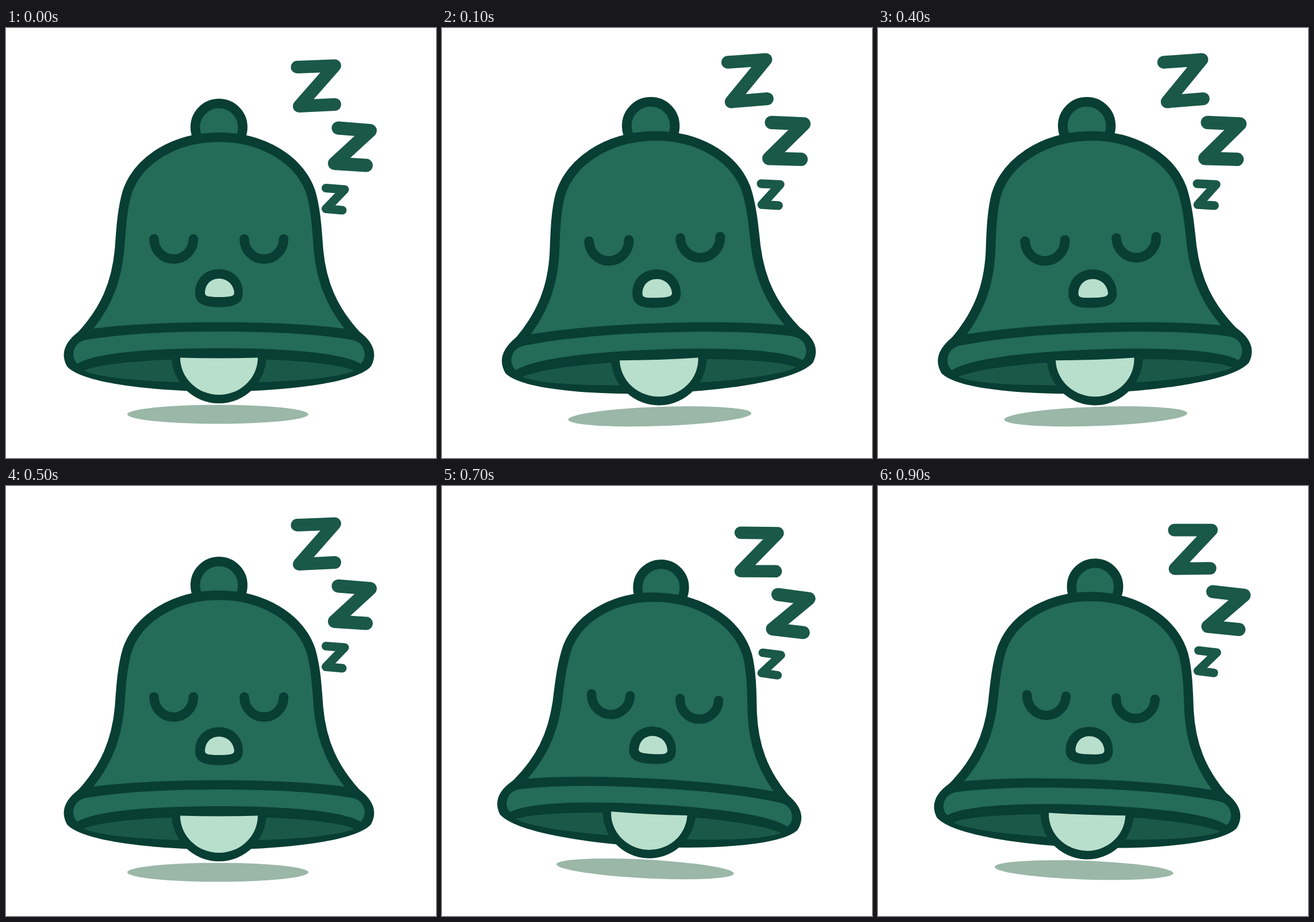
An HTML page that plays this animation: 748x748 px, repeating every 1 s.

```html
<!DOCTYPE html>
<html lang="en">
<head>
<meta charset="utf-8">
<title>Sleeping bell</title>
<style>
  html, body { margin: 0; width: 100%; height: 100%; overflow: hidden; background: #fff; }
  svg { display: block; width: 100vw; height: 100vh; }
  .dark { fill: #083e33; }
  .line { stroke: #083e33; stroke-width: 16.5; stroke-linecap: round; stroke-linejoin: round; }
  .body { fill: #246b58; }
  .inside { fill: #1a5848; }
  .light { fill: #b8dfcc; }
  .open { fill: none; }
  .snore { fill: none; stroke: #1a5848; stroke-linecap: round; stroke-linejoin: round; }
</style>
</head>
<body>
<svg viewBox="0 0 748 748">
  <g id="bell">
    <ellipse cx="368.5" cy="672" rx="157.5" ry="16.5" fill="#9ab7a8"/>

    <g class="snore">
      <path stroke-width="22" d="M506.5 68 L572 65.5 L510 136 L572 133"/>
      <path stroke-width="23" d="M578 174 L633.5 178.5 L571.5 235.5 L626.5 239"/>
      <path stroke-width="15" d="M556.5 278.5 L589 281 L556.5 314.5 L585 317"/>
    </g>

    <circle class="body line" cx="370.5" cy="172.5" r="41.3"/>
    <path class="body line" d="M132 534 C172 490 192 445 197.5 385 C200 350 202 315 211 285
      C231 228 295 190 370.5 190 C446 190 510 228 530 285
      C539 315 541 350 543.5 385 C549 445 569 490 609 534Z"/>

    <!-- rim -->
    <path class="dark line" d="M132 534 C200 524 290 520 370.5 520 S541 524 609 534
      C629 549 638 565 628 584 C601 610 481 624 370.5 624
      S140 610 113 584 C103 565 112 549 132 534Z"/>
    <path class="body" d="M117 567 C118 553 127 544 142 542 C210 531 290 528 370.5 528
      S531 531 599 542 C614 544 623 553 624 567 Q624 577 617 584
      C581 563 471 557 370.5 557 S160 563 124 584 Q117 577 117 567Z"/>
    <path class="inside" d="M135 596 C165 583 260 575 370.5 575 S576 583 606 596
      C576 610 481 617 370.5 617 S165 610 135 596Z"/>

    <!-- clapper -->
    <path class="dark" d="M288 570 A82.5 83 0 0 0 453 570Z"/>
    <path class="light" d="M303 573.5 Q370.5 575.5 438 573.5 A67.5 64.5 0 0 1 303 573.5Z"/>

    <!-- face -->
    <path class="open line" d="M257.5 367 a34.2 35 0 0 0 68.5 0 M414.5 367 a34.2 35 0 0 0 68.5 0"/>
    <path class="dark" d="M329 461 C329 436 347 419.5 370.5 419.5 S412 436 412 461
      C412 479 398 485.5 370.5 485.5 S329 479 329 461Z"/>
    <path class="light" d="M346 460 C347 444 358 436 370.5 436 S395 444 397 460
      C397 466 393 468 371 468 S346 466 346 460Z"/>
  </g>
</svg>
<script>
  const bell = document.getElementById('bell');
  const STEP = 100;
  const TILTS = [0, -2, -3, -3, -2, 0, 2, 3, 3, 2];

  // The bell shrinks and drifts slightly as it tilts clockwise.
  function pose(tilt) {
    const x = 370.2 - 1.3 * tilt;
    const y = 453 - 0.5 * tilt;
    const scale = 1 - 0.0062 * tilt;
    return `translate(${x} ${y}) rotate(${tilt}) scale(${scale}) translate(-370.2 -453)`;
  }

  function draw(time) {
    const step = Math.floor(time / STEP) % TILTS.length;
    bell.setAttribute('transform', pose(TILTS[step]));
  }

  let start;
  function tick(now) {
    start ??= now;
    draw(now - start);
    requestAnimationFrame(tick);
  }

  draw(0);
  requestAnimationFrame(tick);
</script>
</body>
</html>
```
